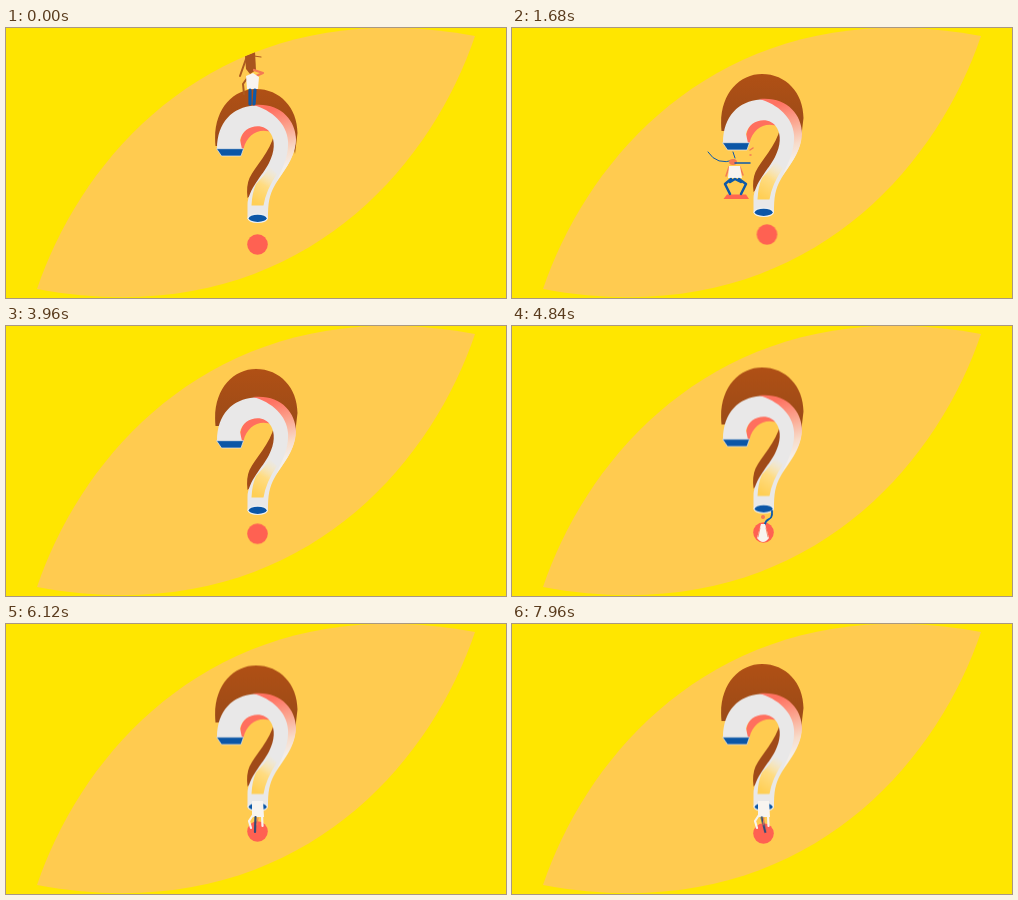
These frames come from a looping animation (500x270 px, 8000 ms). An HTML page:

```html
<!DOCTYPE html>
<html lang="en">
<head>
<meta charset="utf-8">
<title>Question mark</title>
<style>
html, body { margin: 0; width: 100%; height: 100%; overflow: hidden; background: #ffe600; }
svg { display: block; width: 100vw; height: 100vh; }
g, circle, path { animation: 8s linear infinite; }
.limb { fill: none; stroke-linecap: round; stroke-linejoin: round; }
.blue { stroke: #0d59a8; }
.skin { stroke: #ad5c20; }
.coral { stroke: #f47954; }
.white { stroke: #f8f4ef; }
.shirt { fill: #f8f4ef; }

#shade { animation-name: shade; animation-timing-function: ease-in-out; }
#mark { animation-name: mark; animation-timing-function: ease-in-out; }
#dot { animation-name: dot; animation-timing-function: ease-in-out; }
@keyframes shade {
  0% { transform: translateY(0); }
  10.5%, 15% { transform: translateY(-.5px); }
  19% { transform: translateY(-12px); }
  21% { transform: translateY(-15px); }
  25%, 42% { transform: translateY(-18.5px); }
  46% { transform: translateY(-27px); }
  49% { transform: translateY(-18px); }
  53%, 60.5% { transform: translateY(-19.5px); }
  65% { transform: translateY(-21px); }
  70% { transform: translateY(-19px); }
  76.5% { transform: translateY(-19.5px); }
  84% { transform: translateY(-21px); }
  91% { transform: translateY(-20px); }
  100% { transform: translateY(-21px); }
}
@keyframes mark {
  0%, 15% { transform: translateY(0); }
  19% { transform: translateY(-8px); }
  21% { transform: translateY(-6px); }
  25%, 42% { transform: translateY(-7.5px); }
  46% { transform: translateY(-10px); }
  49% { transform: translateY(-6px); }
  53%, 100% { transform: translateY(-7.5px); }
}
@keyframes dot {
  0%, 12% { transform: translate(0, 0); }
  16% { transform: translate(0, 8px); }
  21% { transform: translate(3.5px, -10px); }
  25% { transform: translate(-1px, -4px); }
  29%, 42% { transform: translate(0, -7px); }
  46% { transform: translate(0, -3px); }
  51%, 60.5% { transform: translate(0, -10px); }
  66% { transform: translate(0, -6px); }
  70%, 76.5% { transform: translate(0, -9px); }
  81% { transform: translate(0, -4px); }
  88%, 100% { transform: translate(0, -7px); }
}

.pose { visibility: hidden; animation-timing-function: step-end; }
#stand { animation-name: showStand; }
#leap { animation-name: showLeap; }
#crouch { animation-name: showCrouch; }
#reach { animation-name: showReach; }
#dangle { animation-name: showDangle; }
#hang { animation-name: showHang; }
@keyframes showStand { 0% { visibility: visible; } 6%, 100% { visibility: hidden; } }
@keyframes showLeap { 0% { visibility: hidden; } 6% { visibility: visible; } 17.5%, 100% { visibility: hidden; } }
@keyframes showCrouch { 0% { visibility: hidden; } 17.5% { visibility: visible; } 26%, 100% { visibility: hidden; } }
@keyframes showReach { 0% { visibility: hidden; } 26% { visibility: visible; } 47%, 100% { visibility: hidden; } }
@keyframes showDangle { 0% { visibility: hidden; } 53% { visibility: visible; } 66%, 100% { visibility: hidden; } }
@keyframes showHang { 0% { visibility: hidden; } 66%, 100% { visibility: visible; } }

#stand > g { animation-name: stand; }
#leap > g { animation-name: leap; transform-origin: 268px 44px; }
#crouch > g { animation-name: crouch; animation-timing-function: ease-out; }
#reach > g { animation-name: reach; animation-timing-function: ease-in; }
#dangle > g { animation-name: dangle; animation-timing-function: ease-out; }
#legs { animation-name: kick; animation-timing-function: ease-in-out; transform-origin: 251px 192px; }
#trail { animation-name: trail; }
#mat { animation-name: mat; transform-origin: 224px 169px; }
@keyframes stand { 0%, 2% { transform: translateY(0); } 4% { transform: translateY(2px); } 6%, 100% { transform: translate(6px, -6px); } }
@keyframes leap {
  0%, 6% { transform: translate(-16px, 6px); }
  10.5% { transform: translate(0, 0); }
  12% { transform: translate(-4px, 1px) rotate(-8deg); }
  15% { transform: translate(-38px, 38px) rotate(-16deg); }
  17.5%, 100% { transform: translate(-46px, 94px); }
}
@keyframes crouch { 0%, 17.5% { transform: translateY(-8px); } 19.5% { transform: translateY(3px); } 21% { transform: translateY(0); } 24%, 100% { transform: translateY(-1px); } }
@keyframes reach { 0%, 26% { transform: translateY(3px); } 28%, 41% { transform: translateY(0); } 42.5% { transform: translateY(3px); } 47%, 100% { transform: translateY(-56px); } }
@keyframes dangle { 0%, 53% { transform: translateY(-34px); } 57%, 63% { transform: translateY(0); } 66%, 100% { transform: translateY(-10px); } }
@keyframes kick {
  0%, 66%, 76.5%, 84% { transform: rotate(0); }
  70%, 80% { transform: rotate(-14deg); }
  73%, 88%, 96% { transform: rotate(14deg); }
  92% { transform: rotate(-8deg); }
  100% { transform: rotate(-16deg); }
}
@keyframes trail { 0%, 18% { opacity: 0; } 19%, 22% { opacity: 1; } 25%, 100% { opacity: 0; } }
@keyframes mat {
  0%, 16% { transform: scaleX(0); }
  18%, 44% { transform: scaleX(1); }
  48%, 100% { transform: scaleX(0); }
}
</style>
</head>
<body>
<svg viewBox="0 0 500 270" preserveAspectRatio="none">
  <defs>
    <linearGradient id="glow" gradientUnits="userSpaceOnUse" x1="269" y1="141" x2="248" y2="174">
      <stop offset="0" stop-color="#ffe9b4" stop-opacity="0"/>
      <stop offset=".5" stop-color="#ffdc82"/>
      <stop offset="1" stop-color="#ffcf55"/>
    </linearGradient>
    <linearGradient id="rim" gradientUnits="userSpaceOnUse" x1="264" y1="82" x2="280" y2="138">
      <stop offset="0" stop-color="#ff7262"/>
      <stop offset=".4" stop-color="#fba993"/>
      <stop offset=".75" stop-color="#f8dcca"/>
      <stop offset="1" stop-color="#f3eeea"/>
    </linearGradient>
    <linearGradient id="rust" x1="0" y1="0" x2="0" y2="1">
      <stop offset="0" stop-color="#b05015"/>
      <stop offset="1" stop-color="#984a18"/>
    </linearGradient>
    <path id="leaf" d="M31 261C79 119 221.500-38 469 8C421 150 278.500 307 31 261Z"/>
    <clipPath id="inLeaf"><use href="#leaf"/></clipPath>
    <clipPath id="belowEnd"><path d="M190 120H300V190H190Z"/></clipPath>
    <clipPath id="belowStem"><path d="M220 183H290V250H220Z"/></clipPath>
  </defs>

  <path fill="#ffe600" d="M0 0H500V270H0Z"/>
  <use href="#leaf" fill="#ffcb50"/>

  <path id="shade" fill="url(#rust)" d="M209.500 118C206 83 226 61 250 61C274 61 291.500 80 291.500 105L289 126C285 88 217 88 215 118Z"/>
  <circle id="dot" cx="251.500" cy="216.500" r="10.300" fill="#ff6152"/>

  <g id="mark">
    <path fill="#a04a18" d="M268.500 105C264 125 249 138 243.500 150Q240 158 241.500 170L277 138V106Z"/>
    <path fill="#ff6f5e" d="M235 122C231 105 244 96 252 96C260 96 264 99 267 105C254 99 241 106 237.500 121Z"/>
    <path fill="#e9e8e8" d="M211 121C211 94 227 79 248 77.500C272 77 289.500 93 289.500 112C289 132 275 146 269 157C263 167 262 176 262 190H241.500V177C242 161 257 147 263 135C269 123 269 113 265 106C258 93 237 97 234 112L236 121Z"/>
    <path fill="url(#rim)" d="M247 77C273 74 290 91 290 112C289 131 277 143 270 155C276 141 283 129 282 113C281 96 266 82 247 77Z"/>
    <path fill="url(#glow)" d="M250 156Q258 148 264 139L271 146Q260 162 257.500 177.500H245.500Q246 165 250 156Z"/>
    <path fill="#0b56a6" stroke="#e9e8e8" stroke-width=".7" d="M210.500 120.700H237.500L235 128H215.500Z"/>
    <ellipse cx="251.700" cy="190.300" rx="10.300" ry="4.800" fill="#edf0f2"/>
    <ellipse cx="251.700" cy="190.300" rx="8.900" ry="3.600" fill="#0b56a6"/>
  </g>

  <path id="mat" fill="#ff6650" d="M215 166.500H234L237 171H211.500Z"/>

  <g clip-path="url(#inLeaf)">
    <g id="stand" class="pose"><g>
      <path class="limb skin" stroke-width="2" d="M242 49L237 56L238 66M240 31L234 48"/>
      <path fill="#a9551d" d="M239 28L249 24L250 42L244 46L240 41Z"/>
      <path class="limb skin" stroke-width="1.200" d="M248 28L255 29"/>
      <path class="limb coral" stroke-width="2.200" d="M250 48L257 45L248 42"/>
      <path class="shirt" d="M240 48L247 45L253 49L252 61H241Z"/>
      <path class="limb blue" stroke-width="3.200" d="M244 62V76M249 62L248 76"/>
    </g></g>

    <g id="leap" class="pose"><g>
      <path fill="#ae5a20" d="M261 17H270L271 31L266 37L261 31Z"/>
      <path class="limb skin" stroke-width="1.800" d="M260 25L258 33L260 42M270 32L276 35L279 26M272 37L276 35L286 43L285 50L276 46"/>
      <path class="shirt" d="M260 38L268 36L272 51L264 53Z"/>
      <path class="limb blue" stroke-width="2.500" d="M262 54L277 53L272 56L279 66M266 56L272 59"/>
      <path class="limb" stroke="#fff" stroke-width="2" d="M279 68L282 66"/>
    </g></g>
  </g>

  <g id="crouch" class="pose"><g>
    <path id="trail" class="limb blue" stroke-width="1" d="M196 124Q205 138 222 132M221 124L223 130"/>
    <path class="limb coral" stroke-width="1.500" d="M238 122L241 120M238 127H239M217 139L214 148M228 139L231 147"/>
    <ellipse cx="221" cy="134" rx="4" ry="3" fill="#f47954"/>
    <path class="limb blue" stroke-width="1.500" d="M223 135L238 135"/>
    <path class="shirt" d="M217 138H228L230 150H216Z"/>
    <path class="limb blue" stroke-width="2.500" d="M219 151L213 156L218 166M227 151L234 156L229 166M218 154L223 151L229 154"/>
  </g></g>

  <g clip-path="url(#belowEnd)"><g id="reach" class="pose"><g>
    <ellipse cx="226" cy="123.500" rx="4" ry="2.500" fill="#f8a05b"/>
    <path class="limb white" stroke-width="2.200" d="M219 128L214.500 134M228 127L232 122"/>
    <path class="limb coral" stroke-width="2" d="M214.500 137L214 147M219 123H222"/>
    <path class="shirt" d="M218.500 127L229 125.500L229.500 140H221Z"/>
    <path class="limb blue" stroke-width="1.200" d="M224.500 127L226 134"/>
    <path class="limb blue" stroke-width="2.500" d="M223 141L222.500 167M227.500 141L227 167"/>
  </g></g></g>

  <g clip-path="url(#belowStem)"><g id="dangle" class="pose"><g>
    <path class="limb blue" stroke-width="1.800" d="M253 198C254 191 261 196 260 185"/>
    <circle cx="251" cy="191" r="2" fill="#f47954"/>
    <path class="shirt" d="M249 198H253L257 212Q251 220 245 212Z"/>
    <path class="limb coral" stroke-width=".8" d="M248 202L246 211M254 202L256 211"/>
  </g></g></g>

  <g id="hang" class="pose">
    <path class="shirt" d="M246 177H257L258 193H246Z"/>
    <path class="limb white" stroke-width="2.200" d="M247 191L243 197L245 204M256 191L256.500 202"/>
    <g id="legs"><path class="limb" stroke="#324b76" stroke-width="2.200" d="M249.500 193L249 208"/></g>
    <path class="limb coral" stroke-width="1" d="M252 194L251 201"/>
  </g>
</svg>
</body>
</html>
```
